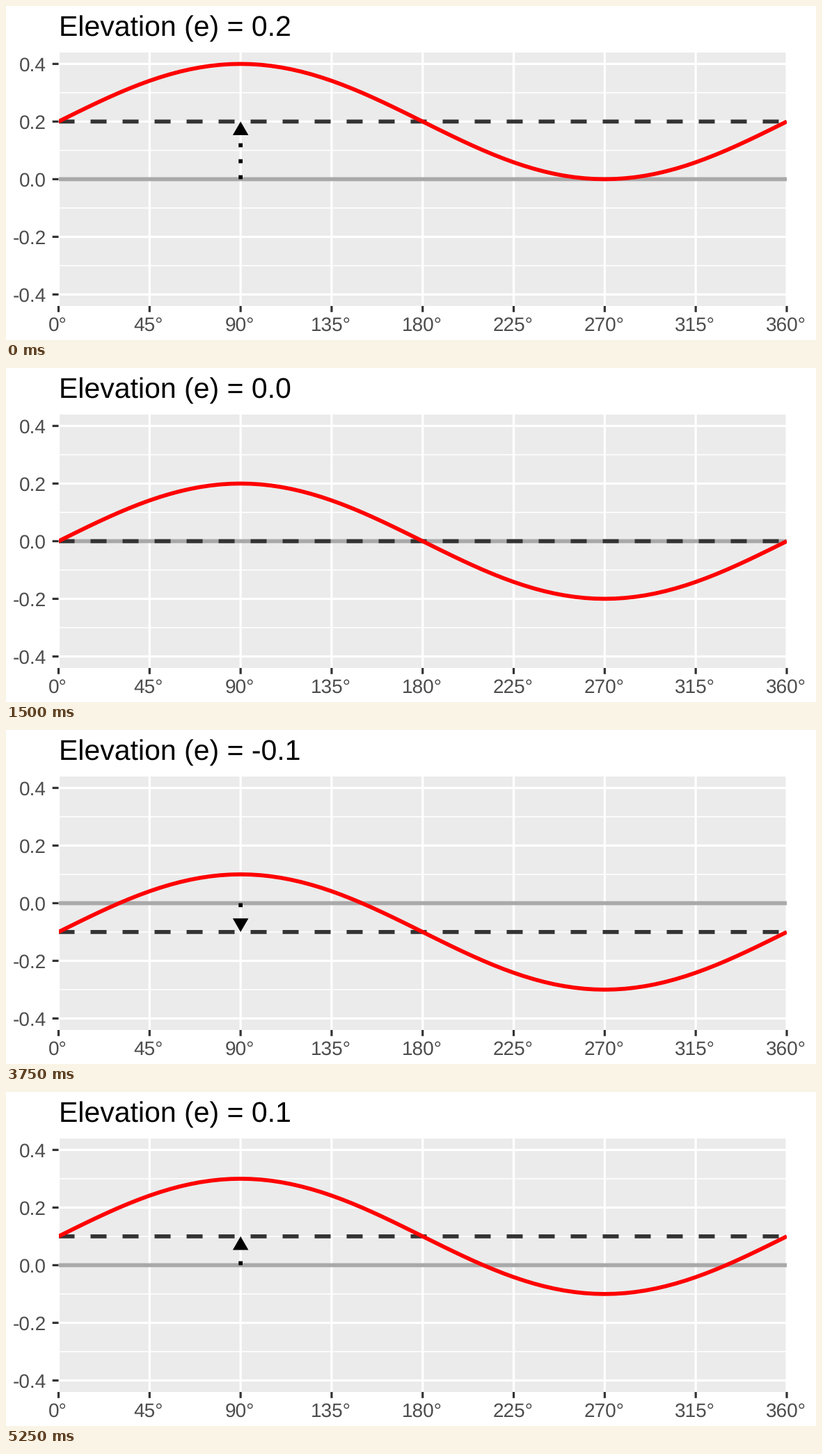
A matplotlib script for the animation above (6000 ms loop, 1164x481 px).

```python
import numpy as np
import matplotlib.pyplot as plt
from matplotlib.animation import FuncAnimation
from matplotlib.patches import Rectangle

W, H, DPI = 1164, 481, 64      # a power of two keeps the size exact
LEFT, RIGHT, TOP, BOTTOM = 75.5, 1122, 66.8, 432
ZERO_Y, UNIT = 249.4, 415      # pixel row of 0.0, pixels per unit
TICK = 8.8
GRID, LINE = 3.2, 5.75         # stroke widths in pixels
HEAD = 22.6                    # side of the arrow head
LEVELS = [0.2, 0.1, 0.0, -0.1, -0.2, -0.1, 0.0, 0.1]

plt.rcParams["font.family"] = "Liberation Sans"
plt.rcParams["text.hinting"] = "none"
plt.rcParams["text.hinting_factor"] = 1


def pt(px):
    return px * 72 / DPI


def px_x(deg):
    return LEFT + deg / 360 * (RIGHT - LEFT)


def px_y(value):
    return ZERO_Y - value * UNIT


fig = plt.figure(figsize=(W / DPI, H / DPI), dpi=DPI, facecolor="white")
ax = fig.add_axes([0, 0, 1, 1])
ax.set_xlim(0, W)
ax.set_ylim(H, 0)
ax.axis("off")

panel = Rectangle((LEFT, TOP), RIGHT - LEFT, BOTTOM - TOP,
                  fc="#EBEBEB", lw=0, zorder=0)
ax.add_patch(panel)


def stroke(xs, ys, color, width, z, clip=True, **style):
    line, = ax.plot(xs, ys, color=color, lw=pt(width), zorder=z, snap=False,
                    solid_capstyle="butt", dash_capstyle="butt", **style)
    if clip:
        line.set_clip_path(panel)
    return line


def label(x, y, text, size, color, **align):
    return ax.text(x, y, text, fontsize=pt(size), color=color, **align)


# Grid, ticks and axis labels
for value in (-0.3, -0.1, 0.1, 0.3):
    stroke([LEFT, RIGHT], [px_y(value)] * 2, "white", GRID / 2, 1)

for value in (-0.4, -0.2, 0.0, 0.2, 0.4):
    y = px_y(value)
    stroke([LEFT, RIGHT], [y, y], "white", GRID, 2)
    stroke([LEFT - TICK, LEFT], [y, y], "#333333", GRID, 2, clip=False)
    label(58.2, y + 10, f"{value:.1f}", 28, "#4D4D4D",
          ha="right", va="baseline")

for deg in range(0, 361, 45):
    x = px_x(deg)
    stroke([x, x], [TOP, BOTTOM], "white", GRID, 2)
    stroke([x, x], [BOTTOM, BOTTOM + TICK], "#333333", GRID, 2, clip=False)
    label(x - 1.3, 467.6, f"{deg}°", 28, "#4D4D4D",
          ha="center", va="baseline")

# Moving parts
stroke([LEFT, RIGHT], [ZERO_Y] * 2, "#A9A9A9", LINE, 3)
midline = stroke([LEFT, RIGHT], [0, 0], "#333333", LINE, 4,
                 linestyle=(0, (4, 4)))
degrees = np.arange(0, 361, 5)
wave = stroke(px_x(degrees), 0 * degrees, "#FF0000", LINE, 5,
              solid_joinstyle="round")
shaft = stroke([], [], "black", LINE, 6, linestyle=(0, (1, 3)))
head, = ax.fill([0, 0, 0], [0, 0, 0], fc="black", lw=0, zorder=7)
title = label(LEFT, 44, "", 40.5, "black", ha="left", va="baseline")


def draw(i):
    level = LEVELS[i % len(LEVELS)]
    y = px_y(level)
    midline.set_ydata([y, y])
    wave.set_ydata(px_y(level + 0.2 * np.sin(np.radians(degrees))))
    title.set_text(f"Elevation (e) = {level:.1f}")

    x = px_x(90)
    base = y + np.sign(level) * HEAD * np.sqrt(3) / 2
    shaft.set_data([x, x], [ZERO_Y, base])
    head.set_xy([(x, y), (x - HEAD / 2, base), (x + HEAD / 2, base)])
    for part in (shaft, head):
        part.set_visible(level != 0)
    return midline, wave, shaft, head, title


anim = FuncAnimation(fig, draw, frames=len(LEVELS), interval=750,
                     repeat=True, repeat_delay=0, blit=False)
plt.show()
```
